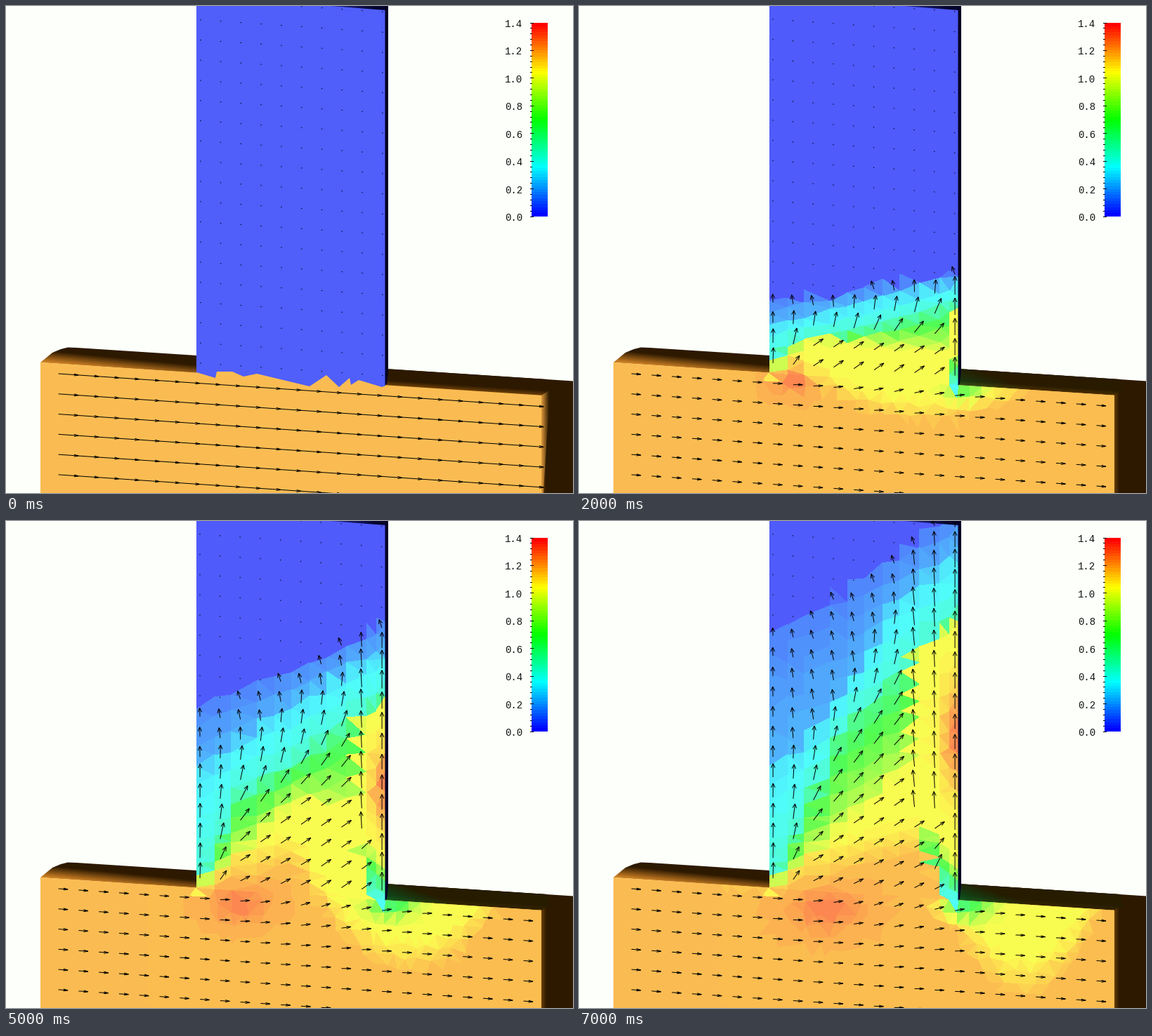
These frames come from a looping animation (807 by 694 pixels, 8 s). A matplotlib script:

```python
import numpy as np
import matplotlib.pyplot as plt
from matplotlib.animation import FuncAnimation
from matplotlib.collections import LineCollection, PolyCollection
from matplotlib.colors import ListedColormap, hsv_to_rgb
from matplotlib.patches import Polygon, Rectangle
from matplotlib.tri import Triangulation

W, H, DPI = 807, 694, 128
PX = 72 / DPI
STEPS = 8
LEFT, RIGHT, END = 271, 540, 762
VMAX, QUIET, JET, FLOW = 1.4, 0.04, 1.04, 1.18
rng = np.random.default_rng(4)


def rgb(r, g, b):
    return r / 255, g / 255, b / 255


def base(x):
    """Upper front edge of the channel."""
    return 508 + 0.0656 * (x - 49)


# ---------- colours ----------
hue = np.linspace(240, 0, 64) / 360
rainbow = hsv_to_rgb(np.stack([hue, np.ones(64), np.ones(64)], axis=1))
BAR = ListedColormap(rainbow)
PALE = ListedColormap((80 + 172 * rainbow) / 255)
BLUE, ORANGE = rgb(80, 94, 250), rgb(250, 188, 82)


# ---------- flow field ----------
def blob(x, y, cx, cy, sx, sy):
    return np.exp(-((x - cx) / sx) ** 2 - ((y - cy) / sy) ** 2)


def jet_edge(t):
    """Left side of the fast stream along the right wall."""
    return 548 - 10.5 * t


def wedge_top(t):
    return 525 - 14 * t


def level_heights(x, t):
    """Heights of the colour bands: they grow with time up to a steady fan."""
    u = np.clip((x - LEFT) / (RIGHT - LEFT), 0, 1)
    front = t * (52 + 28 * u ** 1.2)
    cyan = np.minimum(t * (30 + 40 * u ** 0.8), 175 + 450 * u ** 1.5)
    green = np.minimum(t * (22 + 38 * u ** 1.2), 620 * u)
    yellow = np.minimum(28 * t, 270 * u)
    stream = 58 * t - 0.9 * (RIGHT - x)
    yellow = np.where(x > jet_edge(t), np.maximum(yellow, stream), yellow)
    return yellow, green, cyan, front


def tower_values(x, rise, t):
    hy, hg, hc, hf = level_heights(x, t)
    bands = [(hy - 22, 1.2), (hy - 10, JET), (hy, 0.93), (hg - 12, 0.58),
             (hg, 0.43), (hc, 0.31), (hc + 8, 0.22), (hf, 0.11), (hf + 1, QUIET)]
    knots = np.maximum.accumulate([h for h, _ in bands], axis=0)
    knots += 0.01 * np.arange(len(bands))[:, None]
    levels = [v for _, v in bands]
    v = np.array([np.interp(r, k, levels) for r, k in zip(rise, knots.T)])
    return np.where((x < LEFT) | (x > RIGHT), 1.2, v)


def channel_values(x, rise, t):
    """Orange stream with a yellow pocket that drifts to the right."""
    pocket = (15 + 13 * t) * (1 - ((x - 420 - 30 * t) / (160 - 8 * t)) ** 2)
    u = np.clip((x - LEFT) / (RIGHT - LEFT), 0, 1)
    edge = np.maximum(pocket, -15 - 90 * u * min(t / 5, 1))
    mix = np.clip((-rise - edge) / (28 + 5 * t) + 0.5, 0, 1)
    return JET + (FLOW - JET) * mix


def field(x, y, t):
    rise = base(x) - y
    v = np.minimum(tower_values(x, rise, t), channel_values(x, rise, t))

    # hot spots behind the left corner and on the right wall
    v += 0.11 * min(t / 2, 1) * (v > 0.95) * blob(
        x, y, 285 + 9.5 * t, 526 + 4 * t, 18 + 4 * t, 14 + 2 * t)
    v += 0.25 * np.clip((t - 2) / 3, 0, 1) * (v > 0.9) * (rise > 0) * blob(
        x, y, RIGHT, 560 - 36 * t, 9 + 2 * t, 20 + 7 * t)

    # slow wedge at the right corner
    top, apex = wedge_top(t), 545 - 9 * t
    s = np.clip((y - top) / (545 - top), 0, 1)
    xl = apex + (524 - apex) * s ** 1.5
    inside = (x > xl) & (x < 546) & (y > top) & (rise > -9)
    dip = 0.75 * s ** 0.7 * np.exp(-((x - xl - 8) / (8 + 28 * s)) ** 2)
    v = np.where(inside, np.minimum(v, 1.08 - dip), v)
    v -= 0.42 * min(t / 3, 1) * (rise < 0) * blob(
        x, y, 549, 549, 20 + 2 * t, 11 + t)
    floor = np.where((y > 480) & (x > 480), 0.36, QUIET)
    return np.clip(v, floor, VMAX)


# ---------- mesh ----------
COLS = [LEFT, 297, 320, 357, 382, 406, 432, 456, 484, 513, 527, RIGHT]


def make_mesh():
    pts = []
    for i, x in enumerate(COLS):
        pts.append((x, base(x)))
        y = base(x) - (9 if i % 2 else 17)
        while y > -45:
            jitter = 0 if x in (LEFT, RIGHT) else rng.uniform(-4, 4)
            pts.append((x, y + jitter))
            y -= 17 if y > 420 else 27
    edge_x = [*np.arange(200, 270, 17), *np.arange(556, END, 17), END]
    pts += [(x, base(x)) for x in edge_x]
    for row in range(1, 12):
        for x in np.arange(200, END - 8, 19):
            dx, dy = rng.uniform(-6, 6, 2)
            pts.append((x + dx + 9 * (row % 2), base(x) + 16 * row + dy * 0.7))
        pts.append((END, base(END) + 16 * row))
    pts = np.array(pts)
    verts = pts[Triangulation(*pts.T).triangles]
    cx, cy = verts.mean(axis=1).T
    keep = (cy > base(cx)) | ((cx > LEFT) & (cx < RIGHT))
    return verts[keep], cx[keep], cy[keep]


# ---------- arrows ----------
GAP, DROP = 28.78, 1.955
TILT = np.degrees(np.arctan(DROP / GAP))
nodes = []
for j in range(-6, 20):
    for k in range(24):
        nx, ny = 74.6 + GAP * k, 524 + DROP * k - GAP * j
        if -2 < ny < 700 and (j <= 0 or 7 <= k <= 16):
            nodes.append((nx, ny))
NX, NY = np.array(nodes).T
IN_TOWER = NY < base(NX)


def arrow_shape(t):
    """Direction in degrees and length in pixels at every node."""
    if t == 0:
        return np.full(NX.size, -TILT), np.where(IN_TOWER, 1.5, GAP)
    v = field(NX, NY, t)
    lean = np.clip(0.1 + (NX - 276) / 60, 0, 1)
    ang = 90 + (60 - 113 * np.sqrt(v)) * lean
    size = np.minimum(24 * np.sqrt(v / 0.5), 24 - 13 * (v - 0.5))
    size = np.where(v < 0.06, 1.5, size)
    fast = (NX > jet_edge(t)) & (v > 0.15) & ((NY < wedge_top(t)) | (NX > 530))
    ang = np.where(fast, 90 + (535 - NX) / 10, ang)
    size = np.where(fast, np.minimum(size + 7, 26), size)
    depth = np.maximum(NY - base(NX), 0)
    turn = 30 * np.exp(-depth / (15 + 7 * t) - ((NX - 450) / 115) ** 2)
    return np.where(IN_TOWER, ang, turn - TILT), np.where(IN_TOWER, size, 13.5)


def step(angle, length):
    return length[:, None] * np.stack([np.cos(angle), -np.sin(angle)], axis=1)


def arrow_lines(t):
    ang, size = arrow_shape(t)
    a = np.radians(ang)
    half = np.radians(12 + 13 * np.abs(np.sin(a)))
    tail = np.stack([NX, NY], axis=1)
    tip = tail + step(a, size)
    lines = [np.stack([tail, tip], axis=1)]
    reach = np.minimum(6.5, size * 0.6)
    for side in (-1, 1):
        barb = tip + step(a + np.pi + side * half, reach)
        lines.append(np.stack([tip, barb], axis=1)[size > 5])
    return np.concatenate(lines)


# ---------- stage ----------
fig = plt.figure(figsize=(W / DPI, H / DPI), dpi=DPI, facecolor=rgb(252, 255, 250))
ax = fig.add_axes([0, 0, 1, 1])
ax.axis("off")


def poly(points, color, z=1):
    return ax.add_patch(Polygon(points, closed=True, facecolor=color,
                                edgecolor="none", linewidth=0, zorder=z))


def shade(points, near, far, amount, z=1.1):
    """Fill a polygon with a blend of two colours; amount(x, y) in 0..1."""
    px, py = np.array(points).T
    x0, x1, y0, y1 = px.min(), px.max(), py.min(), py.max()
    x, y = np.meshgrid(np.linspace(x0, x1, 150), np.linspace(y0, y1, 80))
    m = np.clip(amount(x, y), 0, 1)[..., None]
    img = ax.imshow(np.array(near) * (1 - m) + np.array(far) * m,
                    extent=(x0, x1, y1, y0), aspect="auto", zorder=z,
                    interpolation="bilinear")
    img.set_clip_path(poly(points, "none", z))
    return img


DARK = rgb(45, 25, 0)
top_left = [(49, 508), (66, 494), (78, 489), (88, 486.5), (101, 487),
            (LEFT, 498), (LEFT, 523)]
lid = [(540, 517), (770, 532), (775, 547), (END, 556), (540, 541)]
shade(top_left, rgb(205, 128, 36), DARK,
      lambda x, y: (base(x) - y) / 16 + (x - 95) / 500)
poly([(540, 517), (W, 534.5), (W, H), (END, H), (END, 555), (540, 541)], DARK)
shade(lid, rgb(110, 64, 8), DARK, lambda x, y: (base(x) - y) / 7)
green_lid = shade(lid, rgb(0, 95, 40), rgb(38, 30, 0),
                  lambda x, y: (x - 545) / 100 + (base(x) - y) / 30, 1.2)
shade([(END, 555), (770, 549), (770, H), (END, H)], rgb(105, 62, 8), DARK,
      lambda x, y: (x - END) / 7, 1.3)
lit_side = shade([(END, 555), (776, 546), (770, 610), (765, H), (END, H)],
                 rgb(225, 155, 60), DARK, lambda x, y: (x - END) / 11, 1.4)

poly([(49, 508), (LEFT, base(LEFT)), (LEFT, 505), (RIGHT, 505),
      (RIGHT, base(RIGHT)), (END, base(END)), (END, H), (49, H)], ORANGE, 2)
ragged = [(LEFT, 522), (298, 530), (300, 521), (322, 521), (338, 528), (357, 524),
          (432, 542), (456, 526), (474, 543), (489, 530), (491, 540), (502, 533),
          (535, 543), (RIGHT, 541)]
poly([(RIGHT, 0), (LEFT, 0)] + ragged, BLUE, 2.1)

verts, CX, CY = make_mesh()
mesh = PolyCollection(verts, cmap=PALE, edgecolors="none", linewidths=0,
                      antialiaseds=False, zorder=3)
mesh.set_clim(0, VMAX)
ax.add_collection(mesh, autolim=False)
outline = [(200, base(200)), (LEFT, base(LEFT)), (LEFT, -1), (RIGHT, -1),
           (RIGHT, base(RIGHT)), (END, base(END)), (END, H), (200, H)]
mesh.set_clip_path(poly(outline, "none"))

shade([(455, -0.5), (RIGHT, 6), (RIGHT, -0.5)], rgb(40, 45, 170), rgb(5, 5, 45),
      lambda x, y: (x - 455) / 70, 4)
poly([(539.5, 0), (544, 0), (544, 519), (542, 538), (539.5, 541)], rgb(4, 0, 38), 4)

arrows = LineCollection([], colors="black", linewidths=PX, zorder=5)
ax.add_collection(arrows, autolim=False)

# ---------- colour scale ----------
BAR_TOP, BAR_END = 24, 300
ax.imshow(np.linspace(VMAX, 0, 276)[:, None], cmap=BAR, aspect="auto",
          extent=(747.5, 770, BAR_END, BAR_TOP), interpolation="nearest", zorder=5)
for i in range(36):
    ty = BAR_END - i * (BAR_END - BAR_TOP) / 35
    major = i % 5 == 0
    ax.add_patch(Rectangle((746, ty - 0.5), 5 if major else 3, 1, linewidth=0,
                           facecolor="black", zorder=6))
    if major:
        ax.text(735.5, ty + 0.5, f"{i * 0.04:.1f}", ha="right",
                va="center_baseline", fontsize=14 * PX, color=rgb(20, 20, 20),
                family="Liberation Mono", zorder=6)

ax.set_xlim(0, W)
ax.set_ylim(H, 0)


def draw(t):
    started = t > 0
    mesh.set_visible(started)
    mesh.set_array(field(CX, CY, t))
    lit_side.set_visible(not started)
    green_lid.set_visible(started)
    green_lid.set_alpha(min(0.3 + 0.1 * t, 0.8))
    arrows.set_segments(arrow_lines(t))
    return mesh, arrows


anim = FuncAnimation(fig, draw, frames=STEPS, interval=1000, repeat=True,
                     repeat_delay=0, blit=False)
plt.show()
```
